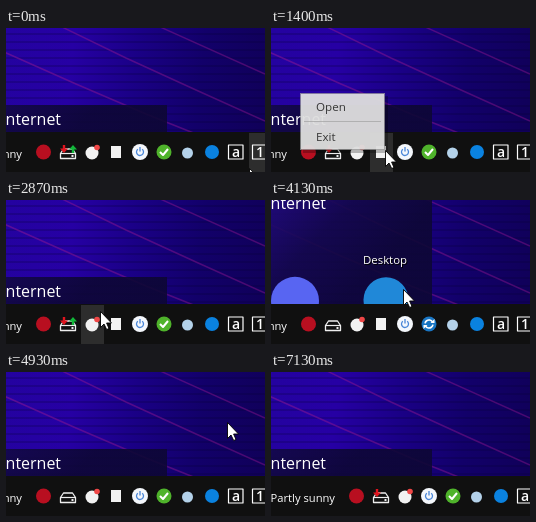
An HTML page with a canvas that plays this animation: 259 px wide and 144 px high, repeating every 7.87 s.

```html
<!DOCTYPE html>
<html lang="en">
<head>
<meta charset="utf-8">
<title>Tray icons</title>
<style>
html, body { margin: 0; width: 100%; height: 100%; overflow: hidden; background: #101010; }
canvas { display: block; width: 100vw; height: 100vh; }
</style>
</head>
<body>
<canvas id="stage" width="259" height="144"></canvas>
<script>
const c = document.getElementById('stage').getContext('2d');
const LOOP = 7870, TICK = 1000 / 15;
const FONT = '"Open Sans", "Noto Sans", sans-serif';

// Pointer path: tick, x, y
const path = [
  [0, 243, 140], [4, 206, 134], [9, 130, 123], [12, 114, 122], [25, 114, 122],
  [29, 102, 111], [30, 102, 111], [31, 94, 111], [59, 94, 111], [64, 158, 75],
  [69, 158, 75], [70, 172, 70], [74, 221, 50], [75, 221, 50], [81, 262, 7], [118, 262, 7]
];
const redOn = [[0, 5], [17, 27], [41, 61], [85, 95], [107, 118]];
const greenOn = [[0, 5], [41, 61]];

const ramp = (k, a, b) => Math.min(1, Math.max(0, (k - a) / (b - a)));
const during = (k, spans) => spans.some(([a, b]) => k >= a && k < b);

function pointerAt(k) {
  const i = path.findIndex(p => p[0] > k);
  const a = path[i - 1], b = path[i], u = ramp(k, a[0], b[0]);
  return [1, 2].map(n => Math.round(a[n] + (b[n] - a[n]) * u));
}

function rect(x, y, w, h, fill) {
  c.fillStyle = fill;
  c.fillRect(x, y, w, h);
}

function blend(x1, y1, x2, y2, colors) {
  const g = c.createLinearGradient(x1, y1, x2, y2);
  colors.forEach((color, i) => g.addColorStop(i / (colors.length - 1), color));
  return g;
}

function disc(x, y, r, fill) {
  c.fillStyle = fill;
  c.beginPath();
  c.arc(x, y, r, 0, 7);
  c.fill();
}

function text(str, x, y, size, align = 'left', fill = '#fff', weight = 400) {
  c.font = `${weight} ${size}px ${FONT}`;
  c.textAlign = align;
  c.fillStyle = fill;
  c.fillText(str, x, y);
}

function label(str, x, y) {
  text(str, x + 1, y + 1, 11.4, 'center', '#000');
  text(str, x, y, 11.4, 'center');
}

function trace(points, close) {
  c.beginPath();
  points.forEach(([x, y]) => c.lineTo(x, y));
  if (close) c.closePath();
}

function line(points, color, width, close) {
  trace(points, close);
  c.strokeStyle = color;
  c.lineWidth = width;
  c.lineJoin = 'round';
  c.stroke();
}

function arc(r, from, to, color, width) {
  c.beginPath();
  c.arc(0, 0, r, from, to);
  c.strokeStyle = color;
  c.lineWidth = width;
  c.stroke();
}

function at(x, y, draw) {
  c.save();
  c.translate(x, y);
  draw();
  c.restore();
}

function wallpaper() {
  rect(0, 0, 259, 104, blend(0, 30, 259, 60, ['#2402a0', '#2600a4', '#1a0086', '#12006a', '#10005a']));
  for (let y = 5; y < 104; y += 8) rect(0, y, 259, 2, 'rgba(6,0,50,.22)');
  const streak = blend(0, 0, 259, 0, ['rgba(130,20,150,.6)', 'rgba(120,16,130,.55)']);
  line([[-2, 24], [70, 56], [140, 86], [190, 106]], streak, 1.4);
  line([[54, -2], [120, 30], [190, 62], [259, 93]], streak, 1.4);
  line([[152, -2], [259, 46]], streak, 1.4);
}

function fence(open) {
  const top = 77 - 147 * open, shift = top + 70;
  c.save();
  c.beginPath();
  c.rect(0, top, 161, 104 - top);
  c.clip();
  c.globalAlpha = .9;
  rect(0, top, 161, 104 - top, blend(0, 0, 85, 85, ['#1f0a74', '#120846', '#0d0734']));
  c.globalAlpha = 1;
  text('Internet', 55, top + 20, 16, 'right');
  if (open) {
    label('Desktop', 114, shift + 5);
    disc(24, shift + 42, 24, '#5865f2');
    label('Talvern', 24, shift + 81);
    disc(115, shift + 41, 22.5, '#2088d8');
    label('ShareX', 115, shift + 81);
  }
  c.restore();
}

function arrow(x, dir, color) {
  at(x, -3, () => {
    c.scale(1, dir);
    rect(-1.2, -4, 2.4, 4, color);
    trace([[-4, -.5], [4, -.5], [0, 4]]);
    c.fillStyle = color;
    c.fill();
  });
}

function drive(k) {
  line([[-4.5, -3], [4.5, -3], [7.5, 1.5], [7.5, 6.5], [-7.5, 6.5], [-7.5, 1.5]], '#eee', 1.3, true);
  line([[-7.5, 1.5], [7.5, 1.5]], '#eee', 1.2);
  rect(3.5, 3, 2, 2, '#eee');
  if (during(k, redOn)) arrow(-4, 1, '#e0141e');
  if (during(k, greenOn)) arrow(5, -1, '#12b83a');
}

function power() {
  disc(0, 0, 8, '#f4f7fc');
  arc(3.5, -.9, 4.04, '#4a86d8', 1.3);
  line([[0, -5], [0, -.5]], '#4a86d8', 1.3);
}

function status(syncing) {
  disc(0, 0, 7.5, syncing ? '#1976c4' : '#4fb32b');
  if (!syncing) return line([[-4, 0], [-1, 3], [4, -3]], '#fff', 2);
  for (const turn of [0, Math.PI]) {
    c.save();
    c.rotate(turn);
    arc(4, 3.3, 5.8, '#fff', 1.6);
    trace([[1.5, -1], [5.5, -1], [5.5, -5]]);
    c.fillStyle = '#fff';
    c.fill();
    c.restore();
  }
}

function boxed(ch) {
  c.strokeStyle = '#fff';
  c.lineWidth = 1.2;
  c.strokeRect(-7.5, -7, 14.5, 14);
  text(ch, 0, 5, 14, 'center', '#fff', 600);
}

function taskbar(k, x, y, inMenu) {
  rect(0, 104, 259, 40, '#101010');
  if (y >= 105 && x < 259 && !inMenu) {
    c.globalAlpha = k > 36 ? ramp(k, 39, 43) : 1;
    rect(75 + 24 * Math.floor((x - 75) / 24), 105, 23, 39, '#2d2d2d');
    c.globalAlpha = 1;
  }
  const right = k >= 102 ? 24 : 0, left = right + (k >= 82 ? 24 : 0);
  const icon = (px, draw) => at(px, 124, draw);
  text('Partly sunny', 16 + left, 130, 11.2, 'right');
  icon(37.5 + left, () => disc(0, 0, 7.5, '#b80f20'));
  icon(62 + left, () => drive(k));
  icon(86 + left, () => {
    disc(0, 1, 6.5, '#f2f2f2');
    disc(5, -4.5, 2.8, '#f04747');
  });
  if (k < 82) icon(110, () => rect(-5, -6, 10, 12, '#f2f2f2'));
  icon(134 + right, power);
  icon(158 + right, () => status(k >= 50 && k < 73));
  icon(181.5 + right, () => disc(0, 1, 5.5, '#b4d2ea'));
  icon(206 + right, () => disc(0, 0, 7, '#0a82e0'));
  icon(230 + right, () => boxed('a'));
  icon(254 + right, () => boxed('1'));
}

function menu(alpha, exitHot) {
  c.save();
  c.globalAlpha = alpha;
  rect(32, 68, 85, 57, 'rgba(0,0,0,.35)');
  rect(29, 65, 85, 57, '#a0a0a0');
  rect(30, 66, 83, 55, '#f2f2f2');
  rect(33, 93, 77, 1, '#a5a5a5');
  if (exitHot) rect(32, 98, 80, 21, '#0078d7');
  text('Open', 45, 83, 11.6, 'left', '#000');
  text('Exit', 45, 113, 11.6, 'left', exitHot ? '#fff' : '#000');
  c.restore();
}

function pointer(x, y) {
  at(x, y, () => {
    trace([[.5, .5], [.5, 16.5], [4, 13], [6.7, 18.5], [9, 17.5], [6.6, 12], [11.5, 12]], true);
    c.fillStyle = '#fff';
    c.fill();
    c.strokeStyle = '#000';
    c.lineWidth = .9;
    c.stroke();
  });
}

function draw(now) {
  const k = Math.min(117, Math.floor((now % LOOP + 4) / TICK));
  const [x, y] = pointerAt(k);
  const alpha = ramp(k, 18, 22) * (1 - ramp(k, 36, 40));
  const inMenu = alpha > 0 && x >= 29 && x < 114 && y >= 65 && y < 122;
  wallpaper();
  fence(ramp(k, 59, 64) * (1 - ramp(k, 70, 74)));
  taskbar(k, x, y, inMenu);
  if (alpha) menu(alpha, inMenu && y >= 98);
  pointer(x, y);
}

const start = performance.now();
function loop() {
  draw(performance.now() - start);
  requestAnimationFrame(loop);
}
loop();
</script>
</body>
</html>
```
